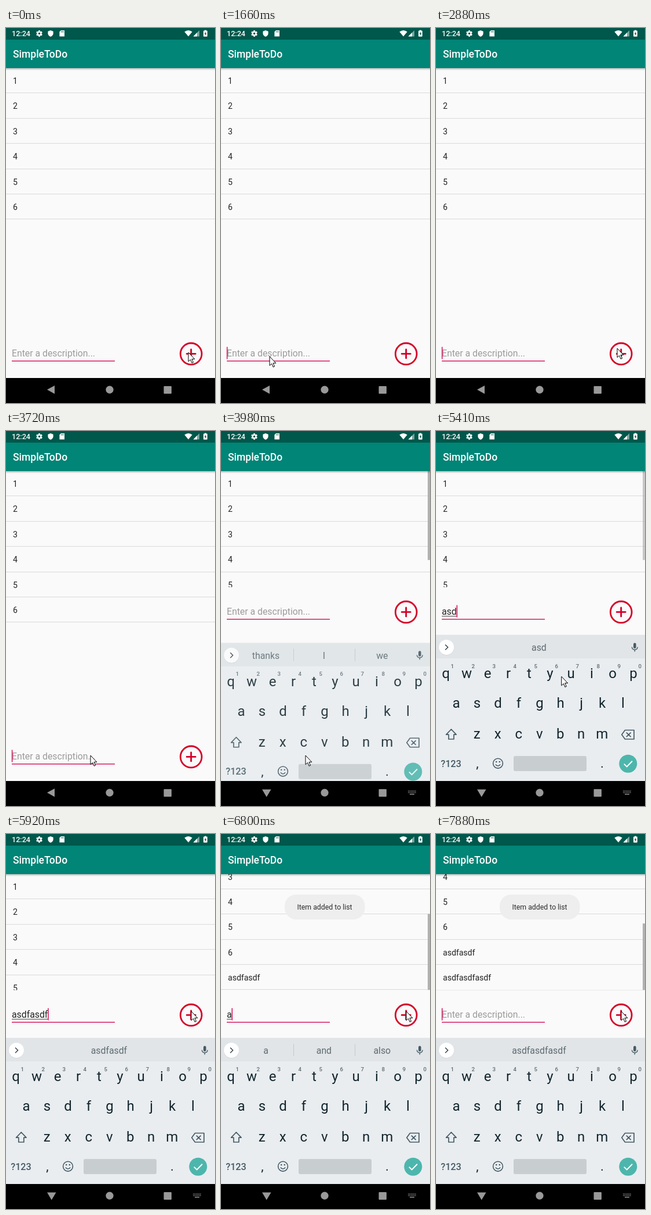
Write an HTML page with a canvas that moves like this. It is 361 by 645 pixels and loops after 8000 ms.

```html
<!DOCTYPE html>
<html lang="en">
<head>
<meta charset="utf-8">
<title>To-do list</title>
<style>
html, body { margin: 0; width: 100%; height: 100%; overflow: hidden; background: #fafafa; }
canvas { display: block; width: 361px; height: 645px; }
</style>
</head>
<body>
<canvas id="stage"></canvas>
<script>
const W = 361, H = 645, LOOP = 8000, TOP = 69, ROW = 43.4, PITCH = 36;
const OPEN = 3860, TYPE1 = 5240, ADD1 = 6290, TYPE2 = 6740, ADD2 = 7880, LETTER = 82;
const PINK = '#d81b60', RED = '#d50027', KEY = '#12252d', ICON = '#455a64', GREY = '#999';
const canvas = document.getElementById('stage');
const dpr = window.devicePixelRatio || 1;
canvas.width = W * dpr;
canvas.height = H * dpr;
const c = canvas.getContext('2d');

// Pointer legs: start, end, then the point reached
const LEGS = [
  [1200, 1660, 83, 564], [1960, 2480, 312, 550], [3040, 3280, 156, 567], [3300, 3440, 12, 560],
  [3440, 3720, 145, 557], [4220, 4610, 146, 506], [4730, 5000, 149, 497], [5150, 5760, 319, 304]
];

const ramp = (t, a, b) => Math.min(1, Math.max(0, (t - a) / (b - a)));
const easeOut = p => 1 - (1 - p) ** 2;
const smooth = p => p * p * (3 - 2 * p);
const word = n => 'asdf'.repeat(3).slice(0, n);

function typing(t, start, max) {
  return t < start ? 0 : Math.min(max, 1 + Math.floor((t - start) / LETTER));
}
function stateAt(t) {
  const first = typing(t, TYPE1, 8), second = typing(t, TYPE2, 12);
  return {
    t,
    open: t >= OPEN,
    items: 6 + (t >= ADD1) + (t >= ADD2),
    field: t >= ADD2 ? 0 : t >= ADD1 ? second : first,
    hint: second || first,
    caret: t >= TYPE1 || (t % 1000 >= 430 && t % 1000 < 930),
    bar: t < OPEN ? 0 : t >= ADD1 ? 1 : 1 - ramp(t, 5290, 5680),
    slide: easeOut(ramp(t, OPEN - 60, OPEN + 220)),
    toast: easeOut(ramp(t, ADD1 - 60, ADD1 + 340))
  };
}

function rect(x, y, w, h, color) {
  c.fillStyle = color;
  c.fillRect(x, y, w, h);
}
function round(x, y, w, h, r, color) {
  c.beginPath();
  c.roundRect(x, y, w, h, r);
  c.fillStyle = color;
  c.fill();
}
function disc(x, y, r, color) {
  c.beginPath();
  c.arc(x, y, r, 0, 7);
  c.fillStyle = color;
  c.fill();
}
function ring(x, y, r, color, width) {
  c.beginPath();
  c.arc(x, y, r, 0, 7);
  c.strokeStyle = color;
  c.lineWidth = width;
  c.stroke();
}
function fill(d, color) {
  c.fillStyle = color;
  c.fill(new Path2D(d));
}
function line(d, color, width) {
  c.strokeStyle = color;
  c.lineWidth = width;
  c.stroke(new Path2D(d));
}
function text(s, x, y, size, color, align = 'left', weight = 400) {
  c.font = `${weight} ${size}px Roboto, sans-serif`;
  c.textAlign = align;
  c.fillStyle = color;
  c.fillText(s, x, y);
}

function statusBar() {
  rect(0, 0, W, 20, '#00574b');
  text('12:24', 10, 14, 12.6, '#fff', 'left', 500);
  c.save();
  c.translate(57.5, 9.5);
  for (let i = 0; i < 6; i++) {
    c.rotate(Math.PI / 3);
    rect(-1.4, -5.4, 2.8, 3, '#fff');
  }
  c.restore();
  ring(57.5, 9.5, 2.9, '#fff', 2.2);
  fill('M77 4L81.6 5.8V9.2Q81.6 13 77 15Q72.4 13 72.4 9.2V5.8Z', '#fff');
  fill('M95 4H101V14.5H92.4V6.6Z', '#fff');
  line('M95.6 5.2V7.6M97.4 5.2V7.6M99.2 5.2V7.6', '#00574b', 0.8);
  fill('M308.3 6.6Q315 1.6 321.7 6.6L315 14.6Z', '#fff');
  fill('M334 4V14.5H323.5Z', '#7ba59f');
  fill('M330 8V14.5H323.5Z', '#fff');
  round(341, 4.6, 6.8, 10.2, 1, '#fff');
  rect(343, 3.6, 2.8, 1.4, '#fff');
  fill('M345 6.6L342.6 10.2H344.1V13L346.4 9.2H344.9Z', '#00574b');
}

function appBar() {
  const g = c.createLinearGradient(0, TOP, 0, TOP + 4);
  g.addColorStop(0, 'rgba(0,0,0,.26)');
  g.addColorStop(1, 'rgba(0,0,0,0)');
  rect(0, TOP, W, 4, g);
  rect(0, 20, W, TOP - 20, '#008577');
  text('SimpleToDo', 12, 51, 17.5, '#fff', 'left', 500);
}

function list({ items, open, bar }) {
  const view = 199.5, scroll = items > 6 ? items * ROW - view : 0;
  c.save();
  c.beginPath();
  c.rect(0, TOP, W, open ? view : 448);
  c.clip();
  for (let i = 0; i < items; i++) {
    const y = TOP + i * ROW - scroll;
    text(i < 6 ? String(i + 1) : word(i === 6 ? 8 : 12), 12, y + 27, 14.05, '#212121');
    rect(0, Math.round(y + 42.4), W, 1, '#dadada');
  }
  const k = view / (items * ROW);
  c.globalAlpha = bar;
  rect(357, TOP + scroll * k, 4, view * k, '#b2b2b2');
  c.restore();
}

function field({ open, field: n, caret }) {
  const y = open ? 311 : 560;
  let x = 10;
  if (n) {
    text(word(n), 10, y + 5, 15.8, '#212121');
    x += c.measureText(word(n)).width;
    rect(10, y + 7, x - 10, 0.9, '#333');
  } else {
    text('Enter a description...', 10, y + 5, 15.8, '#9b9b9b');
  }
  rect(10, y + 12, 178, 1.5, PINK);
  if (caret) rect(x - 0.2, y - 11.5, 1.6, 21, PINK);
  ring(319.7, y + 0.4, 18.4, RED, 2.8);
  c.lineCap = 'round';
  line(`M312.2 ${y + 0.4}h15M319.7 ${y - 7.1}v15`, RED, 2.9);
  c.lineCap = 'butt';
}

function suggestions(n) {
  rect(0, 351, W, 40, '#e1e5e8');
  disc(18, 372.6, 13.2, '#d0d5d8');
  disc(18, 372, 13, '#fff');
  line('M16 367.5L20.5 372L16 376.5', '#37474f', 1.5);
  const words = n === 0 ? ['thanks', 'I', 'we'] : n === 1 ? ['a', 'and', 'also'] : ['', word(n), ''];
  words.forEach((w, i) => text(w, 77.5 + i * 100.4, 378, 15.8, '#5d6a70', 'center'));
  if (n < 2) for (const x of [125, 231]) rect(x, 361, 1, 21, '#c3c9cc');
  round(341, 364.5, 4.6, 9.6, 2.3, ICON);
  line('M338.4 371.5Q338.8 376.2 343.3 376.2Q347.8 376.2 348.2 371.5M343.3 376V379.4', ICON, 1.4);
}

function keyRow(keys, x, y, size = 24, color = KEY, weight = 400) {
  [...keys].forEach((k, i) => text(k, x + i * PITCH, y, size, color, 'center', weight));
}

function keyboard({ slide, hint }) {
  if (!slide) return;
  c.save();
  c.beginPath();
  c.rect(0, TOP, W, 533);
  c.clip();
  c.globalAlpha = slide;
  c.translate(0, (1 - slide) * 110);
  rect(0, 350, W, 1, '#eff1f2');
  rect(0, 351, W, 251, '#e9edf0');
  suggestions(hint);
  keyRow('qwertyuiop', 17, 425);
  keyRow('asdfghjkl', 35, 476);
  keyRow('zxcvbnm', 70.7, 529);
  keyRow('1234567890', 28.2, 407.5, 9.6, '#5d6a70', 500);
  c.lineJoin = 'round';
  line('M26.3 513L35 522.2H30.8V530H21.8V522.2H17.6Z', ICON, 1.7);
  line('M326.5 514.5H342V530H326.5L320.8 522.2ZM328.8 518.6L336.6 526.2M336.6 518.6L328.8 526.2', ICON, 1.7);
  c.lineJoin = 'miter';
  text('?123', 26, 577.5, 16.2, ICON, 'center', 500);
  text(',', 71.5, 579, 22, KEY, 'center');
  text('.', 287, 579, 22, KEY, 'center');
  ring(107, 571.7, 8.4, ICON, 1.6);
  disc(104.2, 569, 1.3, ICON);
  disc(109.8, 569, 1.3, ICON);
  line('M102.8 573.5Q107 578.6 111.2 573.5', ICON, 1.5);
  round(134, 559, 126, 26, 3, '#c8cdd0');
  disc(331.8, 572.2, 15.5, '#4db6ac');
  line('M324.8 572.6L329.6 577.4L339 567.8', '#fff', 2);
  c.restore();
}

function navBar(open) {
  rect(0, 602, W, 43, '#000');
  fill(open ? 'M71 616.5H86.5L78.7 629.5Z' : 'M84 615V629.2L71 622.1Z', GREY);
  disc(179, 622.2, 6.6, GREY);
  round(272.5, 616, 13.4, 13, 1, GREY);
  if (!open) return;
  for (let i = 0; i < 6; i++)
    for (let j = 0; j < 2; j++) rect(323.2 + i * 2.4, 618.6 + j * 2.6, 1.4, 1.4, GREY);
  rect(326, 624, 8, 1.4, GREY);
}

function toast(alpha) {
  c.save();
  c.globalAlpha = alpha;
  round(110, 104, 138.5, 43, 20, '#eee');
  text('Item added to list', 179, 130, 12.3, '#2c2c2c', 'center');
  c.restore();
}

function pointer(t) {
  let x = 314, y = 557;
  for (const [a, b, toX, toY] of LEGS) {
    const p = smooth(ramp(t, a, b));
    x += (toX - x) * p;
    y += (toY - y) * p;
  }
  c.save();
  c.translate(x + 1, y + 1);
  const d = 'M0 0V15.6L3.6 12.4L6.1 18.2L8.5 17.2L6 11.4H10.8Z';
  fill(d, '#fff');
  line(d, '#000', 1);
  c.restore();
}

function draw(now) {
  const s = stateAt(now % LOOP);
  c.setTransform(dpr, 0, 0, dpr, 0, 0);
  rect(0, 0, W, H, '#fafafa');
  list(s);
  statusBar();
  appBar();
  field(s);
  keyboard(s);
  navBar(s.open);
  toast(s.toast);
  pointer(s.t);
}

const start = performance.now();
function tick() {
  draw(performance.now() - start);
  requestAnimationFrame(tick);
}
tick();
</script>
</body>
</html>
```
